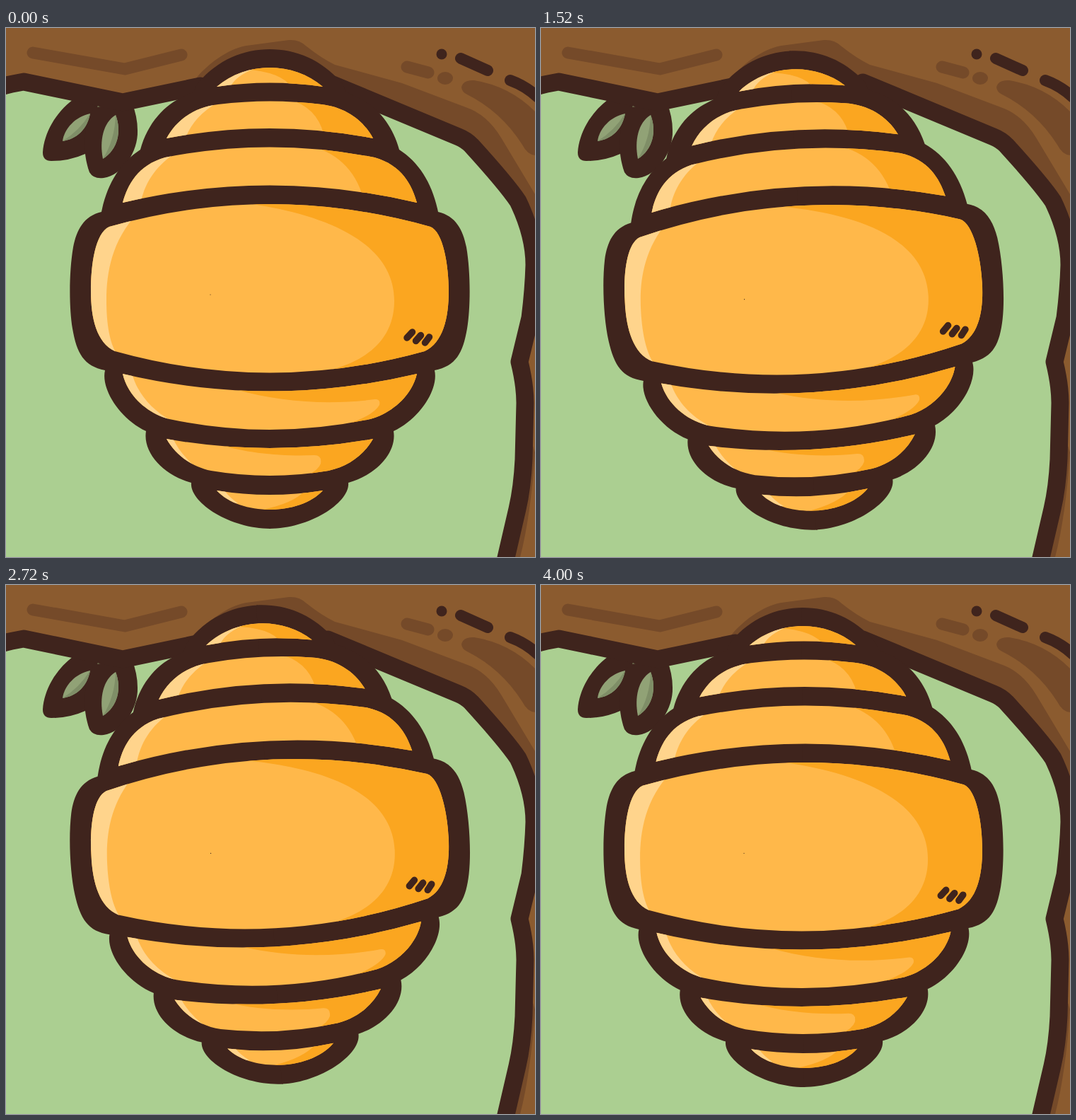
An HTML page for the animation above (4.08 s loop, 748 by 748 pixels).

```html
<!DOCTYPE html>
<html lang="en">
<head>
<meta charset="utf-8">
<title>Swaying beehive</title>
<style>
  html, body { margin: 0; width: 100%; height: 100%; overflow: hidden; background: #abcf91; }
  svg { display: block; width: 100%; height: 100%; }
  .ink { fill: #3f241d; }
  .line { fill: none; stroke: #3f241d; stroke-linecap: round; stroke-linejoin: round; }
  .bark { fill: #8b5b2f; }
  .shade { fill: #754a29; }
  .groove { fill: none; stroke: #754a29; stroke-width: 17; stroke-linecap: round; stroke-linejoin: round; }
  .leaf { fill: #91a276; }
  .leafShade { fill: #7f8e67; }
  .honey { fill: #ffb84a; }
  .light { fill: #ffd48c; }
  .dark { fill: #fba620; }
</style>
</head>
<body>
<svg viewBox="0 0 748 748">
  <defs>
    <path id="half" d="M374 30C335 30 300 45 272 77Q268 82 266 90L253 96C224 108 200 135 190 172C162 190 143 220 135 260C110 266 100 285 95 310C89 345 89 395 94 425C100 460 110 478 140 484C134 510 160 552 198 570C193 600 222 632 262 643C259 670 315 708 374 708Z"/>
    <path id="rings" d="M298 83C340 47 406 47 448 83Q373 72 298 83Z
      M227 156C241 130 266 112 300 108Q373 99 446 108C480 112 505 130 519 156Q373 128 227 156Z
      M165 247C172 222 186 194 225 183Q373 154 521 183C560 194 574 222 581 247Q373 198 165 247Z
      M146 281Q373 217 600 281C618 288 626 335 626 372C626 410 618 445 592 457Q373 518 154 457C128 445 120 410 120 372C120 335 126 290 146 281Z
      M165 489Q373 538 581 489C574 520 545 545 515 553Q373 583 231 553C200 545 172 520 165 489Z
      M227 581Q373 607 519 581C506 604 484 620 456 626Q373 640 290 626C262 620 240 604 227 581Z
      M298 654Q373 666 448 654C415 690 331 690 298 654Z"/>
    <clipPath id="inside"><use href="#rings"/></clipPath>
  </defs>

  <!-- leaves -->
  <path class="ink" d="M95 90V101C70 120 54 148 52 176Q52 188 64 188Q90 188 112 178L135 90Z"/>
  <path class="ink" d="M125 112C108 140 108 175 118 204Q124 214 138 212C165 208 187 175 186 145Q186 125 178 106Z"/>
  <path class="leaf" d="M80 160C82 143 98 125 119 121C115 143 100 157 80 160Z"/>
  <path class="leafShade" d="M80 160Q103 146 119 121C115 143 100 157 80 160Z"/>
  <path class="leaf" d="M155 123C137 134 132 160 137 185C158 172 164 146 155 123Z"/>
  <path class="leafShade" d="M155 123Q154 158 137 185C158 172 164 146 155 123Z"/>

  <!-- branch and trunk -->
  <path class="bark" d="M0 0H748V748H708L723 680 732 610 734 530 726 472 741 410 747 335 745 295 728 242 655 162 480 90 275 82 165 105 25 76 0 84Z"/>
  <path class="shade" d="M268 72C290 45 320 28 340 25L400 17Q415 16 425 26Q445 42 465 52L560 78 650 112Q680 122 700 155L748 235V290L728 240 655 162 480 90 275 82Z"/>
  <path class="shade" d="M644 84Q646 73 662 74Q712 82 748 118V180Q737 179 730 165Q700 118 652 94Q645 91 644 84Z"/>
  <path class="shade" d="M735 560L748 600Q742 690 727 748H700Z"/>
  <path class="groove" d="M38 35L168 58 248 38M567 55L597 63"/>
  <ellipse class="shade" cx="621" cy="71" rx="11" ry="9"/>
  <circle class="ink" cx="616" cy="37" r="7.5"/>
  <path class="line" stroke-width="16" d="M643 43L681 60M713 74Q735 82 752 98"/>
  <path class="line" stroke-width="25" d="M-10 84L0 81Q18 77 25 76L165 105 275 82M455 77L640 154Q650 158 658 166Q708 221 724 245Q747 293 747 335Q746 370 741 410L726 472Q734 505 734 530L732 610Q730 650 723 680L704 762"/>

  <g id="hive">
    <use href="#half" class="ink"/>
    <use href="#half" class="ink" transform="translate(746) scale(-1 1)"/>
    <use href="#rings" class="honey"/>
    <g clip-path="url(#inside)">
      <path class="dark" d="M335 58Q392 62 404 85L460 90V50Z
        M398 100Q440 112 449 150L540 165V95Z
        M425 165Q488 180 505 240L600 260V160Z
        M310 244C425 256 549 292 549 386C549 440 510 470 460 483V520H660V240Z
        M325 511C390 530 460 533 522 525Q530 525 528 533Q520 548 478 562L600 560V480L330 500Z
        M300 588C340 602 395 606 436 604Q447 604 445 616Q442 625 425 633L530 630V575L300 580Z
        M422 655Q405 673 358 682L460 690V650Z"/>
      <path class="light" d="M318 82Q325 68 350 58L300 50 290 90Z
        M254 155Q266 124 300 105L220 100V160Z
        M191 245C197 217 214 192 243 175L150 170V250Z
        M186 262C150 300 142 345 142 385C142 420 147 445 156 460L100 470V260Z
        M178 488C185 515 205 540 235 556L160 550V485Z
        M236 580Q246 603 272 624L225 620 220 575Z
        M309 654Q316 664 328 672L295 670V650Z"/>
    </g>
    <path class="line" stroke-width="9.500" d="M567 438L574.500 430M579.500 442.500L586.500 434.500M592.500 445L598.500 437"/>
    <circle class="ink" cx="289" cy="377" r=".6"/>
  </g>
</svg>
<script>
  const LOOP = 4080, STEP = 80, SWAY = 3.5;
  const shake = [[0, 0], [2, -2], [-2, 2], [2, 0], [2, 2], [-2, -2],
                 [2, 0], [-2, 2], [2, -2], [0, 2], [0, -2], [-2, 0]];
  const hive = document.getElementById('hive');

  function draw(now) {
    const tick = Math.floor((now % LOOP) / STEP);
    const angle = -SWAY * Math.sin(Math.PI * tick * STEP / LOOP);
    const [dx, dy] = shake[tick % shake.length];
    hive.setAttribute('transform', `translate(${dx} ${dy}) rotate(${angle} 373 369)`);
  }

  const start = performance.now();
  function loop() {
    draw(performance.now() - start);
    requestAnimationFrame(loop);
  }
  loop();
</script>
</body>
</html>
```
